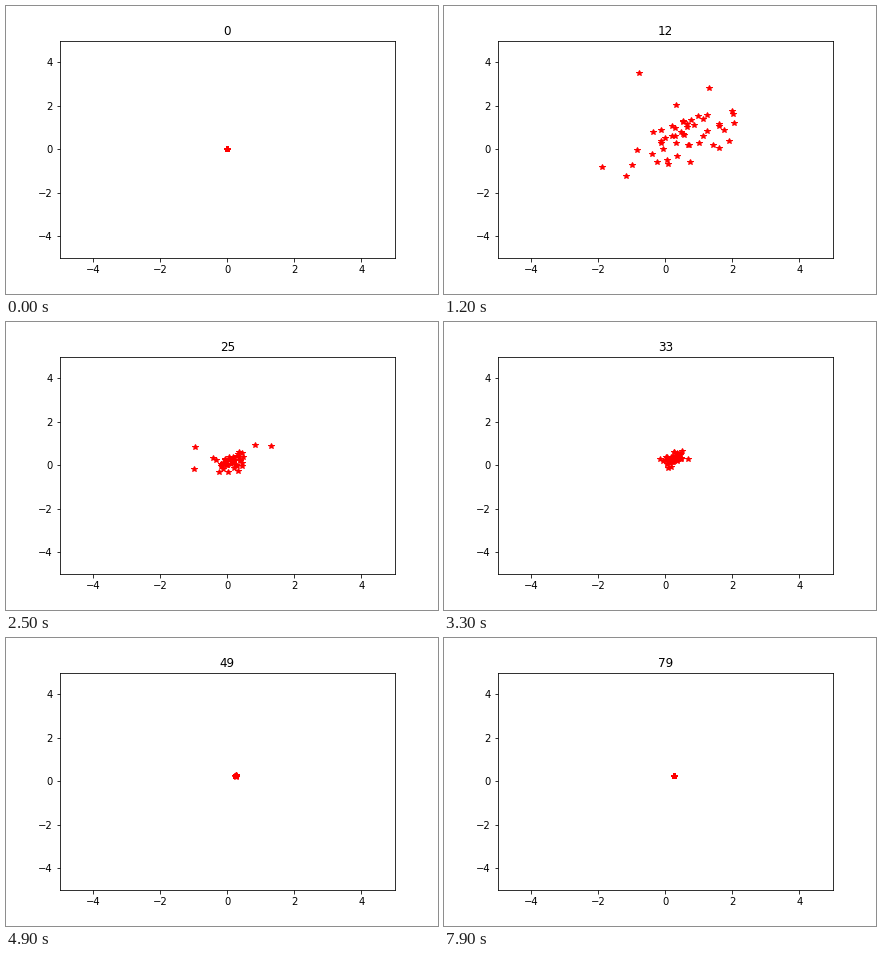
A matplotlib script that plays this animation: 432x288 px, repeating every 8000 ms.

```python
import numpy as np
import matplotlib.pyplot as plt
from matplotlib.animation import FuncAnimation

FRAMES = 80
N = 50
GOAL = np.array([0.257, 0.243])
WIDE, NEAR, TIGHT = 6, 19, 33  # key steps of the swarm

# Stragglers: where they are at the WIDE and at the NEAR step
FAR_WIDE = [(-4.25, -1.87), (-3.87, .24), (3.21, -.95), (4.32, 1.76)]
FAR_NEAR = [(-1.22, .1), (-1.07, 1.57), (.45, 2.31), (1.3, 1.21)]

rng = np.random.default_rng(7)


def cloud(n, along, across, center):
    """Random cloud stretched along the diagonal."""
    u, w = np.clip(rng.normal(size=(2, n)), -2, 2) * [[along], [across]]
    return np.column_stack([u + w, u - w]) + center


rest = N - len(FAR_WIDE)
wide = np.vstack([FAR_WIDE, cloud(rest, 1.3, .8, (-.1, .1))]) - GOAL
near = np.vstack([FAR_NEAR, cloud(rest, .33, .2, (.18, .22))]) - GOAL
tight = cloud(N, .11, .055, (.2, .26)) - GOAL

# Stragglers swing slowly, the others slowly or fast
slow = (np.arange(N) < len(FAR_WIDE)) | (rng.random(N) < .4)
freq = np.pi / 26 * np.where(slow, 1, 3)


def positions(t):
    ramp = min(t / WIDE, 1)
    late = max(t - WIDE, 0)
    half = np.pi / (NEAR / 2)
    burst = np.exp(-.1 * late) * np.sin(half * t) / np.sin(half * WIDE)

    damp = np.exp(.1 * (NEAR - WIDE - late))
    swing = ramp ** 2 * damp * np.sin(freq * (t - WIDE)) / np.sin(freq * (NEAR - WIDE))

    s = np.clip((t - NEAR) / (TIGHT - NEAR), 0, 1)
    settle = s * s * (3 - 2 * s)
    end = max(t - TIGHT, 0)
    fade = np.exp(-.08 * end - .004 * end ** 2)

    offset = burst * wide + swing[:, None] * near + settle * tight
    return ramp * GOAL + fade * offset


fig = plt.figure(figsize=(6, 4), dpi=72)
ax = fig.add_axes([.125, .125, .775, .755])
ax.set_xlim(-5, 5)
ax.set_ylim(-5, 5)
stars, = ax.plot([], [], "r*")
title = ax.set_title("0")


def update(i):
    stars.set_data(*positions(i).T)
    title.set_text(str(i))
    return stars, title


anim = FuncAnimation(fig, update, frames=FRAMES, interval=100,
                     repeat=True, repeat_delay=0)
plt.show()
```
